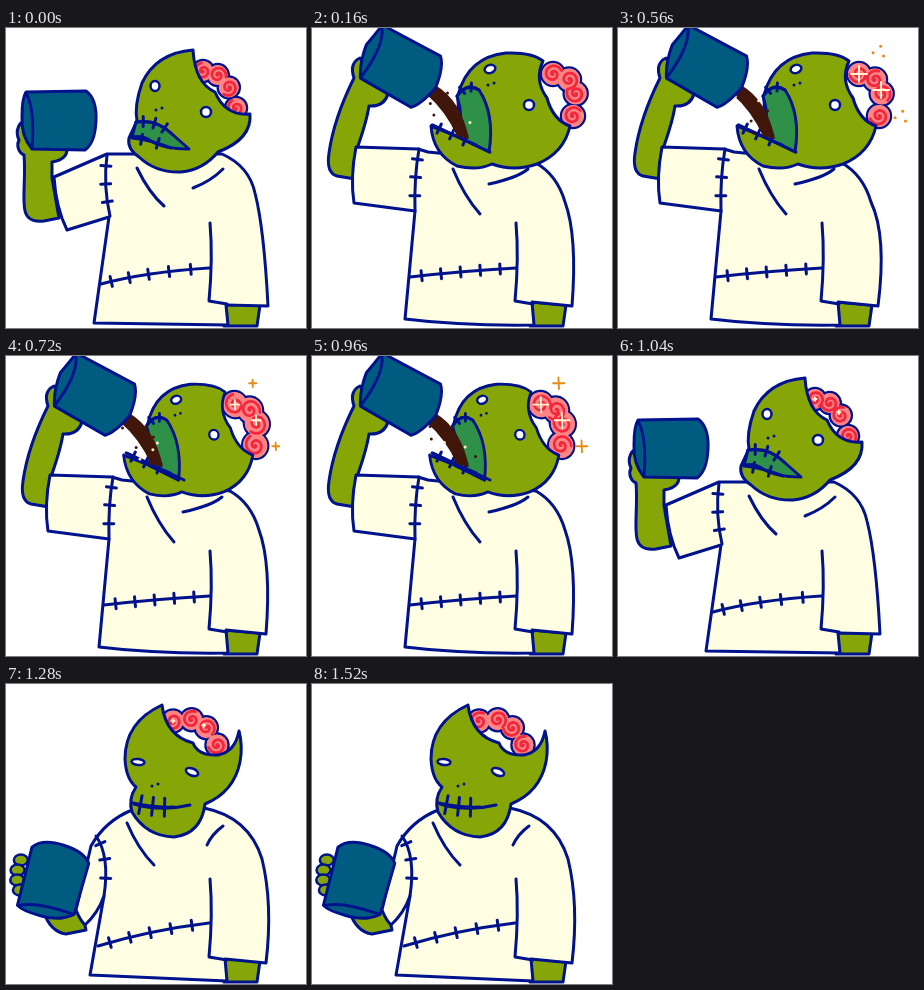
An HTML page with a canvas for the animation above (1.6 s loop, 300 by 300 pixels).

```html
<!DOCTYPE html>
<html>
<head>
<meta charset="utf-8">
<style>
html, body { margin: 0; width: 100%; height: 100%; overflow: hidden; background: #fff; }
canvas { display: block; width: 300px; height: 300px; }
</style>
</head>
<body>
<canvas id="stage" width="300" height="300"></canvas>
<script>
const ctx = document.getElementById('stage').getContext('2d');
const STEP = 80, STEPS = 20;
const INK = '#00128c', SKIN = '#86a607', CUP = '#005b80', CLOTH = '#fffee2', PINK = '#ff8585',
      RED = '#f3263c', MOUTH = '#2f9148', COFFEE = '#3f1609', ORANGE = '#e88a14', GLOW = '#fff2cc';

function shape(d, fill, ink = INK, width = 3) {
  const p = new Path2D(d);
  if (fill) { ctx.fillStyle = fill; ctx.fill(p); }
  if (ink) { ctx.strokeStyle = ink; ctx.lineWidth = width; ctx.stroke(p); }
}
const line = d => shape(d);

function oval(x, y, rx, ry, fill, ink, turn = 0) {
  ctx.beginPath();
  ctx.ellipse(x, y, rx, ry, turn, 0, 7);
  ctx.fillStyle = fill;
  ctx.fill();
  if (ink) { ctx.strokeStyle = ink; ctx.lineWidth = 2.5; ctx.stroke(); }
}
const dot = (x, y, fill = INK) => oval(x, y, 1.5, 1.5, fill);
const eye = (x, y, rx, ry, turn) => oval(x, y, rx, ry, '#fff', INK, turn);
function nose(x, y) { dot(x, y); dot(x + 6, y - 2); }

// Point and direction on a quadratic curve
function along([x0, y0, cx, cy, x1, y1], t) {
  const s = 1 - t;
  return {
    x: s * s * x0 + 2 * s * t * cx + t * t * x1,
    y: s * s * y0 + 2 * s * t * cy + t * t * y1,
    angle: Math.atan2(s * (cy - y0) + t * (y1 - cy), s * (cx - x0) + t * (x1 - cx))
  };
}

// A seam with evenly spaced cross stitches
function stitch(curve, count, reach = 5) {
  const [x0, y0, ...rest] = curve;
  line(`M${x0} ${y0}Q${rest}`);
  for (let i = 0; i < count; i++) {
    const { x, y, angle } = along(curve, (i + 0.6) / (count + 0.4));
    const dx = -Math.sin(angle) * reach, dy = Math.cos(angle) * reach;
    line(`M${x - dx} ${y - dy}L${x + dx} ${y + dy}`);
  }
}

// Four curled lumps along a curve
function brain(curve, n, radius) {
  const lumps = [0, 1, 2, 3].map(i => along(curve, i / 3));
  lumps.forEach(p => oval(p.x, p.y, radius, radius, PINK, INK));
  lumps.forEach(p => oval(p.x, p.y, radius - 1, radius - 1, PINK));
  lumps.forEach((p, i) => {
    ctx.beginPath();
    for (let a = 0; a < 11; a += 0.4) {
      const r = a * radius / 14, b = a + i * 2 + n * 0.7;
      ctx.lineTo(p.x + r * Math.cos(b), p.y + r * Math.sin(b));
    }
    ctx.strokeStyle = RED;
    ctx.lineWidth = 2.8;
    ctx.stroke();
  });
}

function cup(x, y, degrees, stretch = 1) {
  ctx.save();
  ctx.translate(x, y);
  ctx.rotate(degrees * Math.PI / 180);
  shape(`M${-33 * stretch} -29L${27 * stretch} -30Q38 -22 ${37 * stretch} 0Q36 22 ${26 * stretch} 29L${-27 * stretch} 28Q-38 15 ${-37 * stretch} -4Q-37 -23 ${-33 * stretch} -29Z`, CUP);
  line(`M${-33 * stretch} -28Q-24 -12 ${-27 * stretch} 27`);
  ctx.restore();
}

function cross(x, y, r, colour) {
  if (r > 1) shape(`M${x - r} ${y}H${x + r}M${x} ${y - r}V${y + r}`, null, colour, 2);
}

// White glints ride on the brain; orange ones flash beside it, then scatter
function sparkle(curve, n, outside) {
  const glint = Math.abs((n + 0.5) % 2.5 - 1.25) / 1.25;
  for (const t of [0, 0.6]) {
    const { x, y } = along(curve, t);
    if (n > 3 && n < 17) cross(x, y, 8 * glint, GLOW);
  }
  if (!outside || n < 3) return;
  const age = n % 4;
  for (const [x, y] of [[261, 24], [283, 89]]) {
    if (age < 2) cross(x, y, (12 - n / 2) * (1 - age / 2), ORANGE);
    else for (let a = age; a < age + 6; a += 2) dot(x + 6 * Math.cos(a), y + 6 * Math.sin(a), ORANGE);
  }
}

function robe(d) {
  shape('M219 274L218 298H251L254 277Z', SKIN);
  shape(d, CLOTH);
  line('M204 195Q207 230 203 273L221 276');
}

function lift(n) {
  const crown = [197, 43, 222, 43, 230, 80];
  shape('M24 92C12 91 9 104 13 112C10 118 13 125 18 127C20 150 16 170 19 183Q22 195 38 193L53 190L46 150V134C58 132 63 126 60 118Z', SKIN);
  robe('M101 126L48 149Q50 180 61 202L103 189L88 295L222 297L220 277L262 278Q258 200 249 165Q243 138 216 126Z');
  line('M131 140Q143 165 158 178M217 141Q205 153 187 160');
  stitch([101, 127, 97, 158, 104, 188], 3);
  stitch([95, 256, 140, 244, 203, 240], 5);

  brain(crown, n, 11);
  shape('M187 22Q150 25 136 55Q128 78 131 93L123 110Q121 121 133 129Q150 145 175 144Q197 142 212 124Q246 111 244 86Q219 88 209 64Q189 55 187 22Z', SKIN);
  eye(149, 58, 4.5, 5);
  eye(200, 84, 5, 5);
  nose(150, 82);
  shape('M130 94Q151 91 166 106L183 121Q158 121 145 113Q137 107 126 109Z', MOUTH);
  stitch([130, 94, 151, 91, 166, 106], 3);
  stitch([126, 110, 145, 112, 165, 120], 2);
  cup(53, 93, 0);
  sparkle(crown, n);
}

function pour(n) {
  shape('M123 57Q149 72 157 111L145 108Q133 82 114 66Z', COFFEE, null);
  for (let i = 0; i < 9; i++) {
    const f = (i * 0.37 + n * 0.29) % 1, side = Math.sin(i * 9 + n * 5) * 13;
    dot(122 + 30 * f + side, 66 + 40 * f - side * 0.3, i % 3 ? COFFEE : GLOW);
  }
}

function drink(n) {
  const gulp = n % 3 === 0, breath = 267 + 2 * Math.sin(n * 2);
  const crown = [241, 46, 272, 48, 261, 88];
  shape('M48 30Q37 35 42 50Q22 90 17 125Q14 145 25 148L43 151L46 118Q55 92 57 78Q72 79 76 66Z', SKIN);
  robe(`M116 124L106 121L44 119Q38 150 42 175L103 183L93 291Q150 298 222 297L220 274L260 278Q${breath} 208 253 174Q245 147 224 135Z`);
  line('M141 141Q152 168 168 186M216 141Q205 150 177 156');
  stitch([107, 121, 102, 150, 103, 183], 3);
  stitch([98, 249, 150, 243, 204, 240], 5);

  ctx.save();
  if (gulp) ctx.transform(0.93, 0, 0.04, 0.97, 3, 4);  // head tips back towards the jaw
  brain(crown, n, gulp ? 14 : 12);
  shape('M146 67Q156 29 194 25Q220 24 231 33Q222 52 235 70Q241 92 258 98Q252 125 225 136Q202 144 180 136Q165 143 145 138Q121 126 119 98L147 109Z', SKIN);
  eye(178, 41, 5.5, 4, -0.3);
  eye(217, 77, 5, 5);
  nose(176, 57);
  shape('M145 68Q155 54 167 62Q183 86 177 124L146 109Q152 90 145 68Z', MOUTH);
  stitch([145, 68, 155, 54, 167, 62], 2, 4);
  sparkle(crown, n, true);
  ctx.restore();

  line('M121 97L178 124');
  stitch([120, 97, 140, 107, 164, 117], 3);
  pour(n);
  cup(88, 40, 29, 1.1);
}

function rest(n) {
  const crown = [167, 37, 198, 28, 211, 61];
  shape('M37 226Q44 248 60 250L80 246L76 228Z', SKIN);
  robe('M126 126Q99 137 85 162L70 226Q74 236 79 241Q92 229 98 212L84 291L221 297L219 275L260 279Q267 220 256 175Q243 133 198 124Z');
  line('M121 139Q132 165 148 181M217 142Q206 150 201 161');
  stitch([90, 152, 104, 172, 98, 212], 3);
  stitch([92, 262, 145, 246, 203, 239], 5);

  brain(crown, n, 11.5);
  shape('M156 21Q119 38 119 75Q120 95 130 103Q122 115 126 128Q140 152 168 153Q195 150 199 120Q228 108 234 78Q237 62 233 47Q229 68 212 71Q192 72 187 59Q160 52 156 21Z', SKIN);
  eye(132, 78, 6.5, 3, 0.1);
  eye(186, 88, 6.5, 3.5, 0.4);
  nose(146, 102);
  if (n < 16) oval(168, 126, 4, 3.5, COFFEE);
  line('M128 120Q155 128 184 121');
  stitch([127, 119, 148, 124, 168, 123], 3, 9);

  for (let i = 0; i < 4; i++) oval(11 + 1.5 * (i - 1.6) ** 2, 176 + 10 * i, 7, 5.5, SKIN, INK);
  cup(48, 197, -75);
  sparkle(crown, n);
}

function render() {
  const n = Math.floor(performance.now() / STEP) % STEPS;
  ctx.clearRect(0, 0, 300, 300);
  if (n < 2 || n === 13) lift(n);
  else if (n < 13) drink(n);
  else rest(n);
  requestAnimationFrame(render);
}

ctx.lineCap = ctx.lineJoin = 'round';
render();
</script>
</body>
</html>
```
